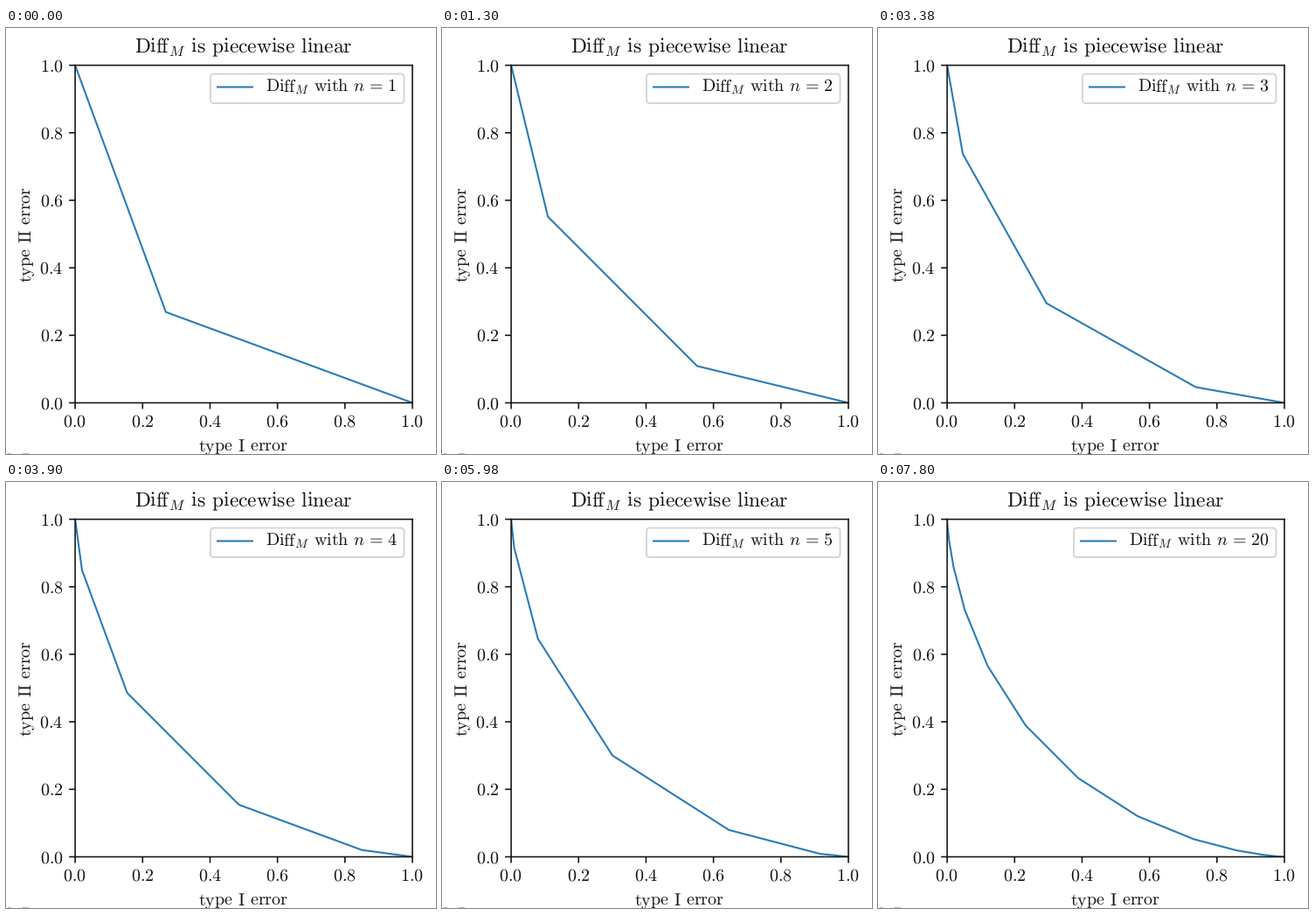
These frames come from a looping animation (492 by 487 pixels, 8 s). A matplotlib script:

```python
from math import comb, exp, sqrt

import matplotlib.pyplot as plt
from matplotlib.animation import FuncAnimation
from matplotlib.patches import FancyBboxPatch

W, H, DPI = 492, 487, 144
LEFT, RIGHT, TOP, BOTTOM = 79.1, 465.0, 42.6, 428.5
BLUE, INK = "#2a7cb6", "0.08"
STEPS = [1, 2, 3, 4, 5, 10, 20]
HOLD, TICK, LOOP = 1300, 100, 8000

plt.rcParams.update({"mathtext.fontset": "cm", "text.hinting": "none"})

SPACE = r"\hspace{0.39}"
THICK = r"\hspace{0.116}"
DIFF = r"\mathrm{Dif\hspace{-0.03}f}_M"


def roman(words):
    return SPACE.join(r"\mathrm{%s}" % w for w in words.split())


def tradeoff(n):
    """Error curve of n-fold randomized response with epsilon = 1/sqrt(n)."""
    p = 1 / (1 + exp(-1 / sqrt(n)))

    def tail(k, r):
        return sum(comb(n, j) * r**j * (1 - r) ** (n - j) for j in range(k, n + 1))

    ks = range(n + 1, -1, -1)
    return [tail(k, 1 - p) for k in ks], [1 - tail(k, p) for k in ks]


fig = plt.figure(figsize=((W + 1e-6) / DPI, (H + 1e-6) / DPI), dpi=DPI, facecolor="white")

ax = fig.add_axes([LEFT / W, 1 - BOTTOM / H, (RIGHT - LEFT) / W, (BOTTOM - TOP) / H])
ax.set(xlim=(0, 1), ylim=(0, 1), xticks=[], yticks=[])
for spine in ax.spines.values():
    spine.set(snap=False, color=INK)
curve, = ax.plot([], [], color=BLUE, lw=1.05)

# Overlay in pixel coordinates, y downwards
stage = fig.add_axes([0, 0, 1, 1], zorder=2)
stage.set(xlim=(0, W), ylim=(H, 0))
stage.axis("off")


def label(x, y, tex, size=10, ha="center", rotation=0):
    return stage.text(x, y, f"${tex}$", fontsize=size, color=INK, ha=ha, va="baseline",
                      rotation=rotation, rotation_mode="anchor")


def stroke(xs, ys, color=INK, lw=0.8):
    line, = stage.plot(xs, ys, color=color, lw=lw, snap=False, solid_capstyle="butt")
    return line


for i in range(6):
    m = i / 5
    x = LEFT + m * (RIGHT - LEFT)
    y = BOTTOM - m * (BOTTOM - TOP)
    stroke([x, x], [BOTTOM, BOTTOM + 7])
    stroke([LEFT - 7, LEFT], [y, y])
    label(x - 0.4, 456, f"{m:.1f}")
    label(65.3, y + 6.6, f"{m:.1f}", ha="right")

label(271.5, 28, DIFF + SPACE + roman("is piecewise linear"), size=11.75)
label(271.6, 483.8, roman("type I error"))
label(29, 235.4, roman("type II error"), rotation=90)

box = FancyBboxPatch((234, 52.5), 221.5, 33.5, boxstyle="round,pad=0,rounding_size=4",
                     fc="white", ec="0.8", lw=1, alpha=0.8)
stage.add_patch(box)
handle = stroke([], [], BLUE, 1.05)
entry = label(297, 73, "n", ha="left")

# Cropped grey remnants at the bottom edge
for x0, x1 in [(2, 6), (19, 26)]:
    stroke([x0, x1], [486.5, 486.5], "0.72", 0.5)


def draw(frame):
    n = STEPS[frame * TICK // HOLD]
    curve.set_data(*tradeoff(n))
    x = 234 if n < 10 else 224
    box.set_x(x)
    box.set_width(455.5 - x)
    handle.set_data([x + 7, x + 49], [67.5, 67.5])
    entry.set_x(x + 63)
    entry.set_text(f"${DIFF}{SPACE}{roman('with')}{SPACE}n{THICK}={THICK}{n}$")
    return curve, box, handle, entry


anim = FuncAnimation(fig, draw, frames=LOOP // TICK, interval=TICK,
                     repeat=True, repeat_delay=0, blit=False)
plt.show()
```
